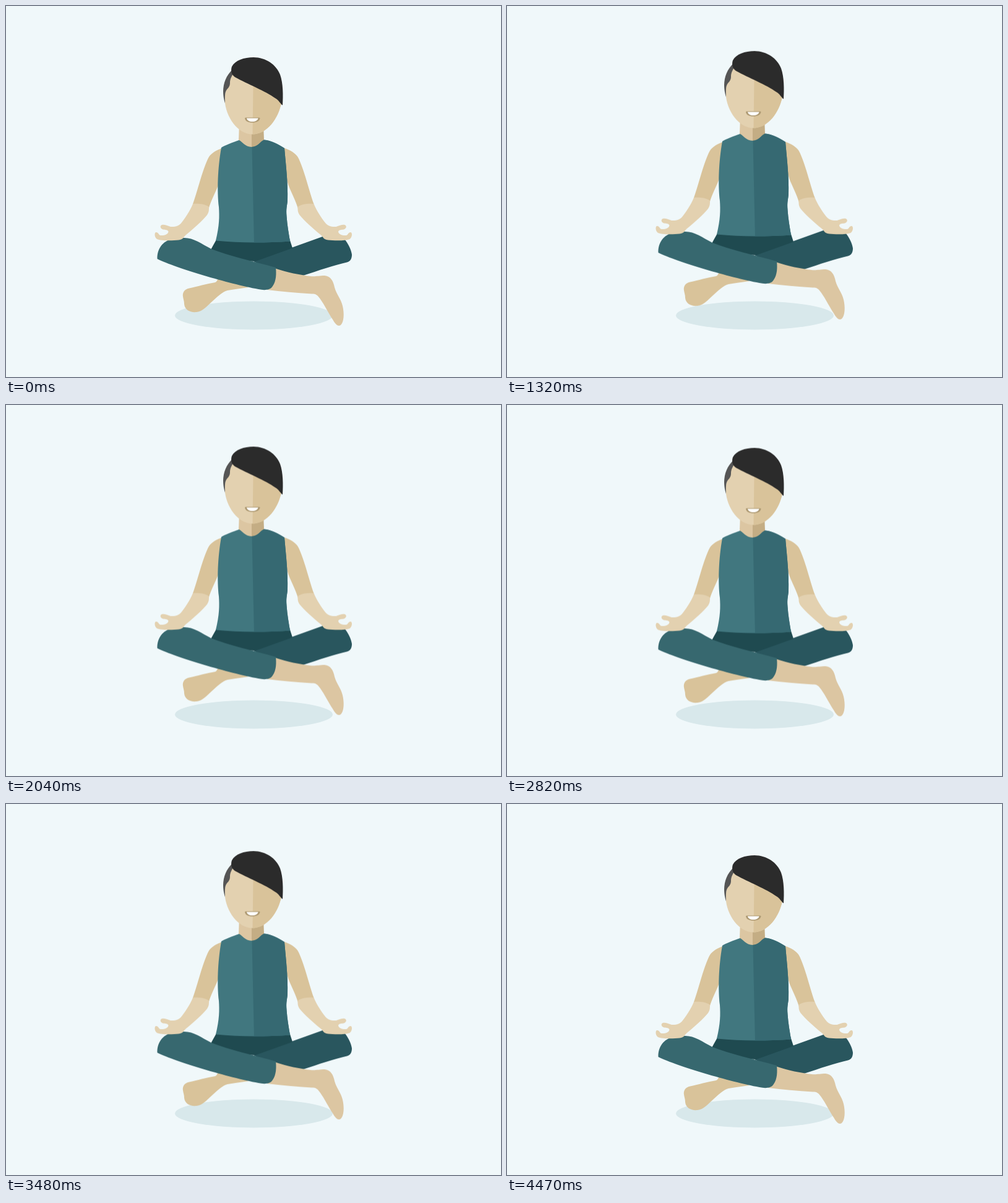
An HTML page for the animation above (4500 ms loop, 800 px wide and 600 px high).

```html
<!DOCTYPE html>
<html lang="en">
<head>
<meta charset="utf-8">
<title>Floating meditation</title>
<style>
  html, body { margin: 0; width: 100%; height: 100%; overflow: hidden; background: #f0f8fa; }
  svg { display: block; width: 100%; height: 100%; }
  .figure { animation: float 2250ms cubic-bezier(.364, 0, .636, 1) infinite alternate; }
  @keyframes float { to { transform: translateY(-16px); } }

  .light { fill: #e3d1b0; }
  .tan { fill: #d9c39a; }
  .skin { fill: #dcc6a2; }
</style>
</head>
<body>
<svg viewBox="0 0 800 600">
  <defs>
    <clipPath id="shirtClip"><path id="shirt" d="M348 229C352 226 368 220 376.500 217C381 218 386 228 397 228C407 228 411 219 417 216.500C428 217 441 224 450 230C452 255 456 285 455 315C454 325 452.500 327 453.500 340C454.500 355 457 368 459 380.500C440 382 420 382.500 401 382.500C380 382.500 360 381.500 339 379.500C345 355 345 340 344 325C341 300 342 262 348 229Z"/></clipPath>
    <clipPath id="faceClip"><path id="face" d="M367 106C362 118 353 135 353.500 152C355 180 375 207.500 398 207.500C422 207.500 440 182 445 157L440 110L400 95Z"/></clipPath>
    <g id="arm">
      <path class="tan" d="M350 229.500C340 233 332 238 328 244C318 262 309 302 302 320L315 330L327.500 328C331 315 338 303 343 290L352 260Z"/>
      <path class="light" d="M302 320C297 332 290 342 284 350C280 356 273 357.500 266 357C260 355 256 353 252 354C248 355.500 249.500 360.500 254 361.500C258 362 261 362 262.500 364.500C262.500 369.500 255 371.500 250 371C246 370.500 247 365.500 242 366C239.500 367.500 240 374 244 377C250 380 270 379.500 279 378.500C287 377.500 286 374 291 370C302 361 318 347 325 338C328 333 328 331 328 325C322 320 310 319.500 302 320Z"/>
    </g>
  </defs>

  <ellipse cx="400.500" cy="500.500" rx="127.500" ry="23" fill="#d8e8eb"/>

  <g class="figure">
    <!-- legs -->
    <path class="tan" d="M345 438C341 443 341 446 338 447C325 449 308 454 296 456.500C288 458 285 464 286 470C287 476 288 477 288 482C289 492 298 496 308 495C318 494 325 485 333 478C342 470 350 462 358 460C368 458 380 457 392 455Z"/>
    <path fill="#29565e" d="M400 413L517 371L547 377C553 384 558 394 559 402C559 408 557 413 551 414.500C530 419 505 428 480 436L430 428Z"/>
    <path class="skin" d="M434 424C455 431 475 435 492 437C500 438 505 436 515 436C525 437 529 445 531 455C534 466 541 473 544 485C547 498 546 511 541 516C536 519 532 514 528 507C522 498 515 484 508 474C503 467 501 465.500 494 465.500C470 464 445 462 422 459Z"/>
    <path fill="#1f4a50" d="M341 376H458L463 391.500L403 413L380 412L331 394Z"/>
    <path fill="#37686f" d="M244.500 409C244 392 254 380 268 377L286 375C302 374 315 384 332 393C360 404 400 413 436 423C437 432 437 445 431 453C427 460 417 460 408 458C360 449 275 424 244.500 409Z"/>

    <!-- arms and torso -->
    <use href="#arm"/>
    <use href="#arm" transform="translate(799.500) scale(-1 1)"/>
    <path class="skin" d="M377 190H398V232H376V217Z"/>
    <path fill="#c4ad84" d="M397 190H416L417 217V232H397Z"/>
    <use href="#shirt" fill="#41777f"/>
    <path fill="#366972" clip-path="url(#shirtClip)" d="M397 205L401 385H470V205Z"/>

    <!-- head -->
    <use href="#face" class="light"/>
    <path class="tan" clip-path="url(#faceClip)" d="M400 90L398.500 210H460V90Z"/>
    <path fill="#555" d="M366 103C356 112 351 125 351 138C351 147 353 154 354 157C354 148 353 140 357 135C361 131 362 128 362 124C362 118 365 113 368 108Z"/>
    <path fill="#2b2b2b" d="M365 98C370 88 385 83 400 83C420 83 437 95 443 111C448 125 448 145 447 160.500C443 158 441 152 435 149C420 138 390 126 370 115C364 111 363 104 365 98Z"/>
    <path fill="#ae9a73" d="M386 181.500Q386 180.500 388 180.500H408.500Q410.500 180.500 410.500 181.500C410 186 405 188.500 398 188.500C391 188.500 386.500 186 386 181.500Z"/>
    <path fill="#fff" d="M389 181.500H407.500C407 185 403 187 398 187C393 187 389.500 185 389 181.500Z"/>
  </g>
</svg>
</body>
</html>
```
